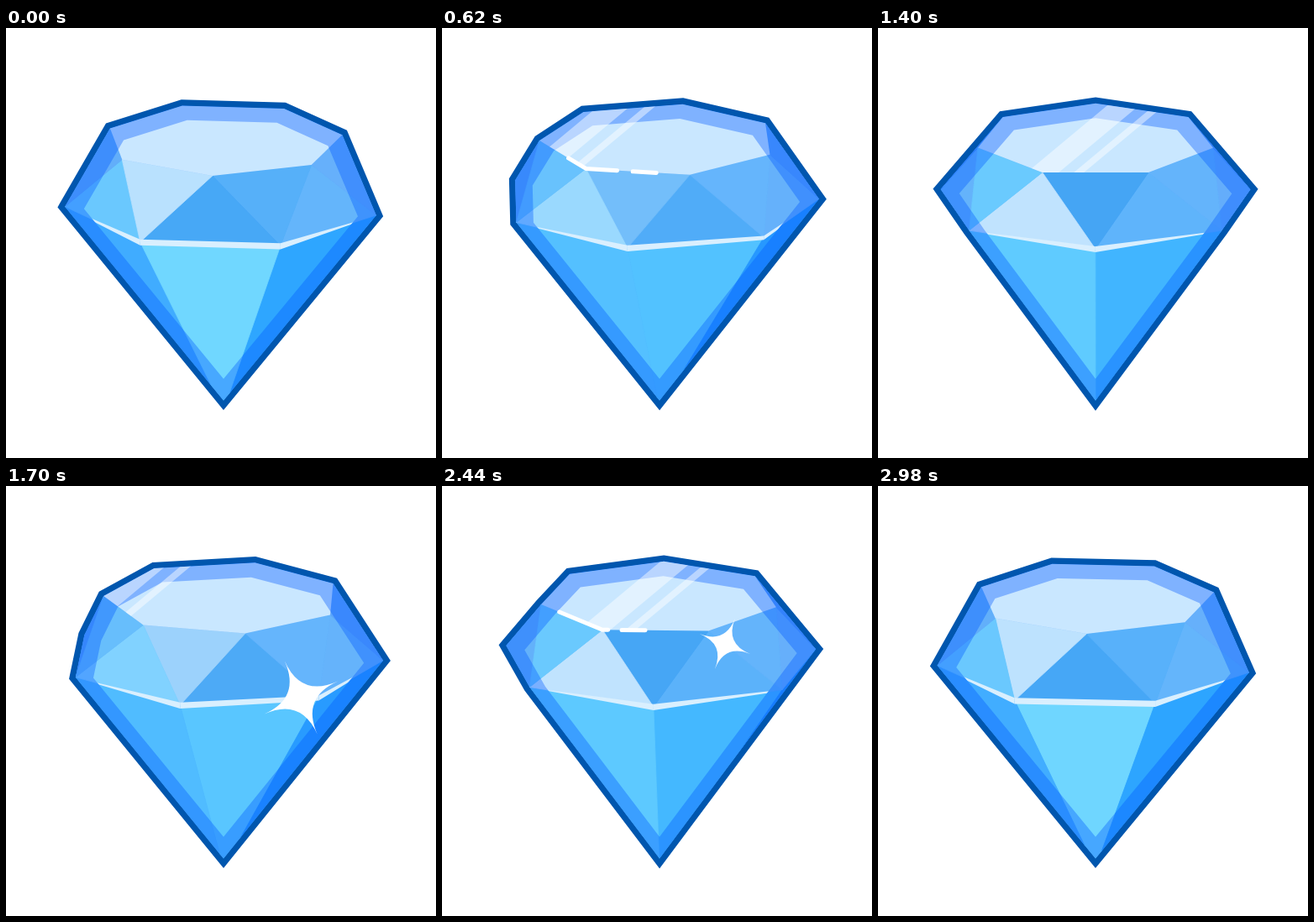
Write an HTML page with a canvas that moves like this. It is 512 by 512 pixels and loops after 3000 ms.

```html
<!DOCTYPE html>
<html lang="en">
<head>
<meta charset="utf-8">
<title>Spinning gem</title>
<style>
html, body { margin: 0; width: 100%; height: 100%; overflow: hidden; background: #fff; }
canvas { display: block; width: 512px; height: 512px; }
</style>
</head>
<body>
<canvas id="stage" width="512" height="512"></canvas>
<script>
const ctx = document.getElementById('stage').getContext('2d');
const LOOP = 3000, CYCLE = 1000, SIDES = 7, STEP = 360 / SIDES;
const CX = 259, TIP = [CX, 443.5], APEX = [CX, 455];
const RAD = Math.PI / 180;

// Facet colours by the direction they face, in degrees (0 = viewer)
const CROWN = [[-110, '#3a8cfa'], [-82, '#62aefa'], [-57, '#6ac8fe'], [-45, '#6accff'],
  [-33, '#b2dffe'], [-29, '#c0e3fe'], [-19, '#bfe3fe'], [-7, '#47a9f7'], [1, '#45a4f4'],
  [20, '#55b0f9'], [29, '#65b6fc'], [56, '#64b4fb'], [75, '#66affb'], [110, '#4a94fb']];
const PAVILION = [[-103, '#2186ff'], [-57, '#40acff'], [-25, '#60ccff'], [-5, '#70d7ff'],
  [25, '#42b6ff'], [46, '#2ea6ff'], [90, '#1c86ff']];

// Sparkles: burst time, position at time `at`, scale, burst angle
const SPARKS = [
  { burst: 170, at: 320, x: 206, y: 176, scale: 1, angle: -29 },
  { burst: 1000, at: 980, x: 191, y: 257, scale: 1.14, angle: -53 },
  { burst: 1765, at: 2020, x: 313, y: 252, scale: 0.87, angle: -8 },
  { burst: 2080, at: 2020, x: 174, y: 180, scale: 0.7, angle: 28 },
  { burst: 2510, at: 2440, x: 337, y: 188, scale: 0.62, angle: 39 }
];
const GROW = 160, BURST = 300, DRIFT = -0.12;

const clamp = v => Math.max(0, Math.min(1, v));
const rgb = hex => [1, 3, 5].map(i => parseInt(hex.slice(i, i + 2), 16));
const wrap = a => ((a + 180) % 360 + 360) % 360 - 180;

function shade(stops, angle) {
  let i = 1;
  while (i < stops.length - 1 && angle > stops[i][0]) i++;
  const [a, from] = stops[i - 1], [b, to] = stops[i];
  const k = clamp((angle - a) / (b - a)), end = rgb(to);
  return `rgb(${rgb(from).map((v, n) => Math.round(v + (end[n] - v) * k))})`;
}

function trace(points, closed = true) {
  points.forEach(([x, y], i) => i ? ctx.lineTo(x, y) : ctx.moveTo(x, y));
  if (closed) ctx.closePath();
}

function fill(points, color) {
  ctx.beginPath();
  trace(points);
  ctx.fillStyle = color;
  ctx.fill();
}

function facet(points, color) {
  const [a, b, c] = points;
  if ((b[0] - a[0]) * (c[1] - a[1]) - (b[1] - a[1]) * (c[0] - a[0]) <= 0) return;
  fill(points, color);
  ctx.strokeStyle = color;
  ctx.lineWidth = 0.8;
  ctx.stroke();
}

function clipTo(points, draw) {
  ctx.save();
  ctx.beginPath();
  trace(points);
  ctx.clip();
  draw();
  ctx.restore();
}

function hull(points) {
  const sorted = [...points].sort((p, q) => p[0] - q[0] || p[1] - q[1]);
  const half = list => {
    const out = [];
    for (const p of list) {
      while (out.length > 1) {
        const [a, b] = out.slice(-2);
        if ((b[0] - a[0]) * (p[1] - a[1]) - (b[1] - a[1]) * (p[0] - a[0]) > 0) break;
        out.pop();
      }
      out.push(p);
    }
    return out.slice(0, -1);
  };
  return [...half(sorted), ...half(sorted.reverse())];
}

// Point on a tilted circle, slightly wider towards the viewer
function ring(angle, rx, y, ry) {
  const depth = Math.cos(angle * RAD);
  return [CX + rx * (1 + 0.02 * depth) * Math.sin(angle * RAD), y + ry * depth];
}
const onTable = a => ring(a, 143, 133, 43.2);
const onGirdle = a => ring(a, 190, 205, 58);

function drawGirdleLine(angles) {
  for (const a of angles) {
    const ends = [a, a + STEP].map(v => {
      const [x, y] = onGirdle(v);
      return { x, y: y + 0.5, h: 3.6 * clamp((Math.cos(v * RAD) - 0.6) / 0.25) };
    });
    const [l, r] = ends;
    if (l.h + r.h === 0 || l.x > r.x) continue;
    fill([[l.x, l.y - l.h], [r.x, r.y - r.h], [r.x, r.y + r.h], [l.x, l.y + l.h]], '#d9effe');
  }
}

function drawSheen(table, phase) {
  const x = 326 - 0.39 * (phase - 400);
  const alpha = 0.45 * clamp((phase - 80) / 120) * clamp((900 - phase) / 100);
  if (!alpha) return;
  clipTo(table, () => {
    for (const [a, b] of [[-62, -24], [-6, 6]]) {
      fill([[x + a + 24, 80], [x + b + 24, 80], [x + b - 96, 180], [x + a - 96, 180]],
        `rgba(255,255,255,${alpha})`);
    }
  });
}

// Bright dashes sliding left along the front rim of the table
function drawGlints(rim, time) {
  if (time < 40 || time > 960) return;
  const yAt = x => {
    const i = rim.findIndex((p, n) => n && x <= p[0]);
    const [a, b] = [rim[i - 1], rim[i]];
    return a[1] + (b[1] - a[1]) * (x - a[0]) / (b[0] - a[0]);
  };
  const first = rim[0][0], last = rim[rim.length - 1][0];
  ctx.strokeStyle = '#fff';
  ctx.lineWidth = 5;
  ctx.lineCap = ctx.lineJoin = 'round';
  ctx.globalAlpha = clamp((time - 40) / 120);
  const shift = time - 256;
  for (const [x, w] of [[250 - 0.193 * shift, 29], [327 - 0.235 * shift, 14]]) {
    const a = Math.max(first + 5, x - w), b = Math.min(last - 5, x + w);
    if (b <= a) continue;
    const mid = rim.filter(p => p[0] > a && p[0] < b);
    ctx.beginPath();
    trace([[a, yAt(a)], ...mid, [b, yAt(b)]], false);
    ctx.stroke();
  }
  ctx.globalAlpha = 1;
  ctx.lineCap = 'butt';
  ctx.lineJoin = 'miter';
}

function drawStar(r) {
  ctx.beginPath();
  ctx.moveTo(0, -r);
  for (const [x, y] of [[r, 0], [0, r], [-r, 0], [0, -r]]) ctx.quadraticCurveTo(0, 0, x, y);
  ctx.fillStyle = '#fff';
  ctx.fill();
}

function drawSpark({ burst, at, x, y, scale, angle }, t) {
  const g = clamp((t - burst + GROW) / GROW), v = (t - burst) / BURST;
  if (!g || v >= 1) return;
  ctx.save();
  ctx.translate(x + DRIFT * (t - at), y);
  ctx.rotate((angle - 40 * (1 - g)) * RAD);
  if (v > 0) {
    const out = 1 - Math.pow(1 - v, 2.5);
    const reach = 140 * scale;
    for (let i = 0; i < 4; i++) {
      const len = reach * (i % 2 ? 0.75 : 1);
      const near = len * Math.pow(v, 1.2), far = len * out, w = 2 * (1 - v * 0.5);
      fill([[0, -near], [w, -far], [-w, -far]], '#c4e8ff');
      ctx.rotate(Math.PI / 2);
    }
    if (v < 0.75) {
      ctx.globalAlpha = clamp((0.75 - v) / 0.2);
      ctx.beginPath();
      ctx.arc(0, 0, 73 * scale * out, 0, 7);
      ctx.strokeStyle = '#fff';
      ctx.lineWidth = 2;
      ctx.stroke();
      ctx.globalAlpha = 1;
    }
  }
  const size = v > 0 ? clamp(1 - v / 0.8) : g;
  if (size) drawStar(92 * scale * size);
  ctx.restore();
}

function draw(t) {
  const phase = t % CYCLE;
  const turn = STEP * (0.4 - phase / CYCLE);
  const angles = Array.from({ length: SIDES }, (_, i) => wrap(turn + i * STEP));
  const half = STEP / 2;
  const table = angles.map(a => onTable(a + half));
  const body = hull([...table, ...angles.map(onGirdle), TIP]);
  const inner = body.map(([x, y]) => [CX + (x - CX) * 0.88, 233 + (y - 233) * 0.878]);

  ctx.fillStyle = '#fff';
  ctx.fillRect(0, 0, 512, 512);
  ctx.beginPath();
  trace(body);
  ctx.strokeStyle = '#0056ae';
  ctx.lineWidth = 14.5;
  ctx.stroke();
  fill(body, '#3d90fb');

  clipTo(body, () => {
    for (const a of angles) {
      const g = onGirdle(a), next = onGirdle(a + STEP), top = onTable(a + half);
      const mid = wrap(a + half);
      facet([g, next, APEX], shade(PAVILION, mid));
      facet([top, next, g], shade(CROWN, mid));
      facet([onTable(a - half), top, g], shade(CROWN, a));
    }
    fill(table, '#c9e7ff');
  });
  clipTo(inner, () => drawGirdleLine(angles));

  ctx.beginPath();
  trace(body);
  trace(inner);
  ctx.fillStyle = 'rgba(0,87,255,0.37)';
  ctx.fill('evenodd');

  drawSheen(table, phase);
  const rim = angles.map(a => wrap(a + half)).filter(a => Math.abs(a) < 90)
    .sort((a, b) => a - b).map(onTable);
  drawGlints(rim, t);
  drawGlints(rim, t - 1764);
  for (const s of SPARKS) drawSpark(s, t);
}

const start = performance.now();
function tick(now) {
  draw(Math.max(0, now - start) % LOOP);
  requestAnimationFrame(tick);
}
draw(0);
requestAnimationFrame(tick);
</script>
</body>
</html>
```
